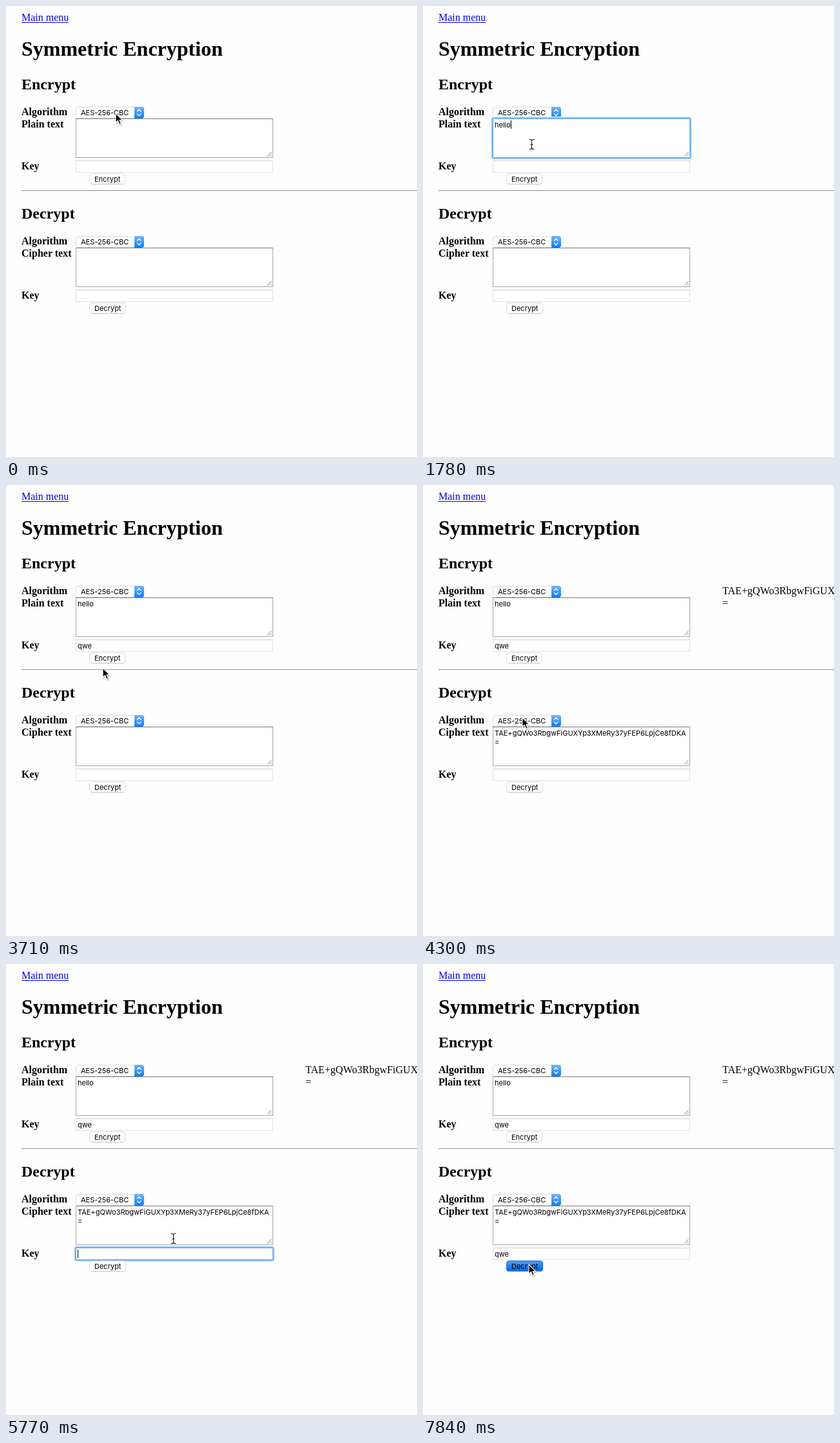
Write an HTML page that moves like this. It is 637x698 px and loops after 7990 ms.

```html
<!DOCTYPE html>
<html lang="en">
<head>
<meta charset="utf-8">
<title>Symmetric Encryption</title>
<style>
  html, body { margin: 0; width: 100%; height: 100%; overflow: hidden; background: #fefefe; }
  svg { display: block; width: 637px; height: 698px; }
  text { white-space: pre; }
  .serif { font-family: "Liberation Serif", "Times New Roman", serif; font-size: 16px; }
  .bold { font-weight: bold; }
  .ui { font-family: Inter, "Open Sans", sans-serif; font-size: 11px; }
</style>
</head>
<body>
<svg id="stage" viewBox="0 0 637 698" xmlns="http://www.w3.org/2000/svg">
  <defs>
    <linearGradient id="blue" x2="0" y2="1">
      <stop offset="0" stop-color="#70b6fb"/>
      <stop offset="1" stop-color="#0f7bfd"/>
    </linearGradient>
    <linearGradient id="pressed" x2="0" y2="1">
      <stop offset="0" stop-color="#4f9ffa"/>
      <stop offset="1" stop-color="#0a62e6"/>
    </linearGradient>
  </defs>
</svg>
<script>
const LOOP = 7990, TICK = 148;
const CIPHER = "TAE+gQWo3RbgwFiGUXYp3XMeRy37yFEP6LpjCe8fDKA";
const stage = document.getElementById("stage");

function add(tag, attrs, parent = stage) {
  const node = document.createElementNS(stage.namespaceURI, tag);
  for (const k in attrs) node.setAttribute(k, attrs[k]);
  return parent.appendChild(node);
}

function label(str, x, y, cls, attrs = {}) {
  const node = add("text", { x, y, class: cls, ...attrs });
  node.textContent = str;
  return node;
}

const path = (d, attrs, parent) => add("path", { d, fill: "none", ...attrs }, parent);
const show = (node, on) => node.setAttribute("visibility", on ? "visible" : "hidden");

function select(y) {
  add("rect", { x: 108.5, y: y + .5, width: 105, height: 17, rx: 3.5, fill: "#fff", stroke: "#dcdcdc" });
  path(`M199 ${y}h11q4 0 4 4v10q0 4 -4 4h-11z`, { fill: "url(#blue)" });
  path(`M203.6 ${y + 7}l2.7 -2.8l2.7 2.8M203.6 ${y + 11}l2.7 2.8l2.7 -2.8`,
    { stroke: "#fff", "stroke-width": 1.3, "stroke-linecap": "round", "stroke-linejoin": "round" });
  label("AES-256-CBC", 116, y + 13, "ui");
}

function focusRing(y, h) {
  const g = add("g", { fill: "none" });
  const layers = [[-2.5, "#deeefe", 3], [-1.5, "#a9d1fb", 2], [-.5, "#74b3f6", 1], [.5, "#6ea9e8", 0]];
  for (const [d, stroke, rx] of layers)
    add("rect", { x: 108 + d, y: y + d, width: 306 - 2 * d, height: h - 2 * d, rx, stroke }, g);
  return g;
}

function field(y, h, area) {
  add("rect", { x: 108.5, y: y + .5, width: 305, height: h - 1, fill: "#fff", stroke: area ? "#a6a6a6" : "#e0e0e0" });
  path(`M108 ${y + .5}h306`, { stroke: area ? "#7c7c7c" : "#d2d2d2" });
  if (area) path(`M405 ${y + h - 2.5}l6.5 -6.5M409 ${y + h - 2.5}l2.5 -2.5`, { stroke: "#777" });
  const ring = focusRing(y, h);
  const text = label("", 111, y + 14, "ui");
  const caret = add("rect", { y: y + 3, width: 1, height: 13 });
  return {
    y, h,
    set(str, focused, blink) {
      if (text.textContent !== str) text.textContent = str;
      show(ring, focused);
      show(caret, focused && blink);
      caret.setAttribute("x", 111 + (str ? Math.round(text.getComputedTextLength()) : 0));
    }
  };
}

function button(str, y, width) {
  const box = add("rect", { x: 129.5, y: y + .5, width, height: 16, rx: 3.5 });
  path(`M132.5 ${y + 17}h${width - 6}`, { stroke: "#c4c4c4", "stroke-width": .8 });
  label(str, 137, y + 13, "ui");
  return down => {
    box.setAttribute("fill", down ? "url(#pressed)" : "#fff");
    box.setAttribute("stroke", down ? "#1c6fe0" : "#dadada");
  };
}

function form(title, kind, top, width) {
  label(title, 24, top + 129, "serif bold", { style: "font-size:24px" });
  label("Algorithm", 24, top + 169, "serif bold");
  label(kind, 24, top + 188, "serif bold");
  label("Key", 24, top + 253, "serif bold");
  select(top + 156);
  return {
    area: field(top + 174, 61, true),
    key: field(top + 239, 19, false),
    press: button(title, top + 259, width)
  };
}

label("Main menu", 24, 23, "serif", { fill: "#00e" });
path("M24 25.5h73", { stroke: "#00e" });
label("Symmetric Encryption", 24, 77, "serif bold", { style: "font-size:32px" });
const enc = form("Encrypt", "Plain text", 0, 55);
path("M24 285.5h613", { stroke: "#9c9c9c" });
path("M24 286.5h613", { stroke: "#ececec" });
const dec = form("Decrypt", "Cipher text", 200, 56);
const result = add("g", {});
result.append(label(CIPHER, 464, 169, "serif"), label("=", 464, 188, "serif"));
const secondLine = label("=", 111, 401, "ui");

// Pointers, both with the hot spot at 0,0
const arrow = add("g", {});
const arrowShape = "M0 0V14.6L3.4 11.5L5.9 17.2L8.3 16.2L5.9 10.6H10.4Z";
path(arrowShape, { fill: "#000", opacity: .18, transform: "translate(1 2)", stroke: "#000", "stroke-width": 1.5 }, arrow);
path(arrowShape, { fill: "#000", stroke: "#fff", "stroke-width": 1.1, "stroke-linejoin": "round" }, arrow);
const beam = add("g", {});
const beamShape = "M-3.5 -7.5H-2Q.5 -7.5 .5 -5.5Q.5 -7.5 3 -7.5H4.5M.5 -6V6M-3.5 7.5H-2Q.5 7.5 .5 5.5Q.5 7.5 3 7.5H4.5M-1.5 .5H2.5";
path(beamShape, { stroke: "#fff", "stroke-width": 2.6, opacity: .8 }, beam);
path(beamShape, { stroke: "#111", "stroke-width": 1.1 }, beam);

// Pointer path: tick, x, y
const route = [
  [0, 170, 166], [2, 169, 250], [4, 168, 214], [20, 168, 214], [22, 160, 266], [23, 160, 268],
  [24, 154, 293], [25, 150, 283], [27, 150, 283], [32, 160, 476], [34, 164, 447], [37, 164, 447],
  [40, 450, 380], [42, 624, 342], [44, 600, 254], [45, 556, 280], [46, 390, 355],
  [51, 172, 461], [53, 164, 465]
];

function pointerAt(n) {
  const i = Math.max(1, route.findIndex(p => p[0] >= n));
  const [t0, x0, y0] = route[i - 1], [t1, x1, y1] = route[i];
  const k = (n - t0) / (t1 - t0);
  return [Math.round(x0 + (x1 - x0) * k), Math.round(y0 + (y1 - y0) * k)];
}

const within = (n, a, b) => n >= a && n < b;
// Letters appear at the listed ticks; a repeated tick types two at once.
const typed = (str, n, ticks) => str.slice(0, ticks.filter(t => n >= t).length);

function draw(time) {
  // The screen refreshes in steps whose length drifts slightly.
  const n = Math.min(53, Math.floor((time - 10 * Math.sin(Math.PI * time / LOOP) + 7) / TICK));
  const done = n >= 27;

  enc.area.set(typed("hello", n, [9, 10, 11, 11, 12]), within(n, 4, 13), !within(n, 7, 9));
  enc.key.set(typed("qwe", n, [16, 16, 17]), within(n, 13, 23), n < 20);
  enc.press(n === 23);
  dec.area.set(done ? CIPHER : "", false, false);
  dec.key.set(typed("qwe", n, [48, 49, 50]), within(n, 36, 53), !within(n, 40, 43) && !within(n, 46, 48));
  dec.press(n === 53);
  show(result, done);
  show(secondLine, done);

  const [x, y] = pointerAt(n);
  const overText = [enc.area, enc.key, dec.area, dec.key]
    .some(f => within(x, 108, 414) && within(y, f.y, f.y + f.h));
  show(beam, overText);
  show(arrow, !overText);
  (overText ? beam : arrow).setAttribute("transform", `translate(${x} ${y})`);
}

const start = performance.now();
function loop() {
  draw((performance.now() - start) % LOOP);
  requestAnimationFrame(loop);
}
loop();
</script>
</body>
</html>
```
